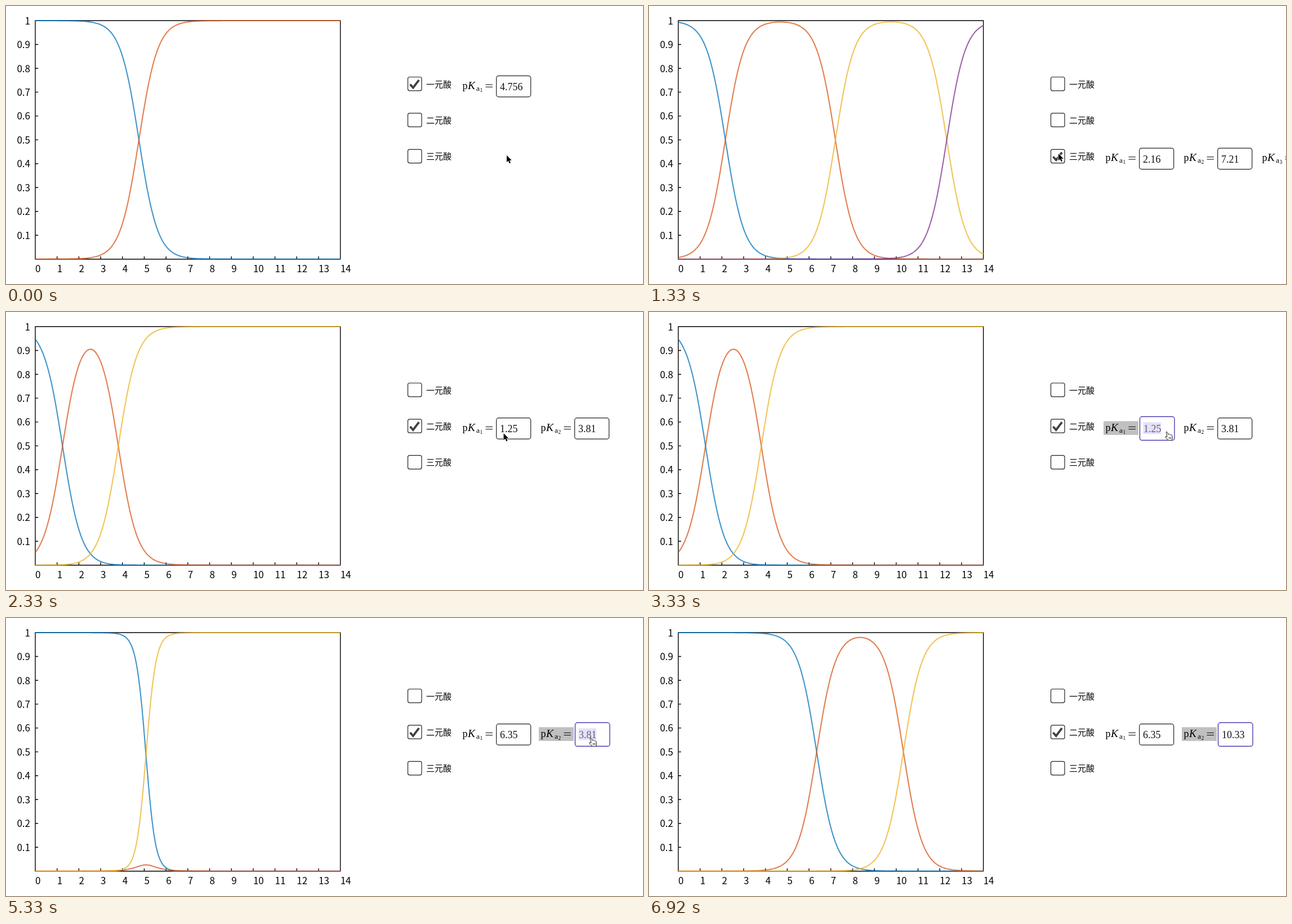
Write an HTML page that moves like this. It is 1131 by 495 pixels and loops after 7.5 s.

```html
<!DOCTYPE html>
<html lang="zh">
<head>
<meta charset="utf-8">
<style>
  html, body { margin: 0; width: 100%; height: 100%; overflow: hidden; background: #fff; }
  svg { display: block; }
  .axis { font: 17px "Noto Sans CJK SC", "Noto Sans CJK", sans-serif; }
  .name { font: 500 15px "Noto Sans CJK SC", "Noto Sans CJK", sans-serif; }
  .math { font: 18px "Liberation Serif", serif; }
  .line { fill: none; stroke: #000; stroke-width: 1.4; }
  .box { fill: #fff; stroke: #222; stroke-width: 1.2; }
  .focus { stroke: #2c20a8; }
  .curve { fill: none; stroke-width: 2.1; stroke-opacity: .75; }
</style>
</head>
<body>
<svg width="1131" height="495" viewBox="0 0 1131 495">
  <g id="axes"></g>
  <g id="curves"></g>
  <g id="panel"></g>
  <g id="pointer"></g>
</svg>
<script>
const $ = id => document.getElementById(id);
const LOOP = 7500;
const X0 = 52, Y0 = 450.7, DX = 38.69, HEIGHT = 424.7;
const COLORS = ['#0072bd', '#d95319', '#edb120', '#7e2f8e'];
const NAMES = ['一元酸', '二元酸', '三元酸'];

const MONO = [4.756], DI = [1.25, 3.81], TRI = [2.16, 7.21, 12.32];
const arrow = (x, y) => ({ kind: 'arrow', x, y });
const hand = (x, y) => ({ kind: 'hand', x, y });

// Each step changes only the properties it lists.
const STEPS = [
  { at: 0, pk: MONO, text: MONO, focus: -1, selected: false, caret: false, cursor: arrow(889, 266) },
  { at: 330, cursor: hand(721, 202) },
  { at: 670, pk: DI, text: DI },
  { at: 1000, cursor: hand(721, 264) },
  { at: 1330, pk: TRI, text: TRI, cursor: arrow(727, 263) },
  { at: 2000, cursor: hand(730, 201) },
  { at: 2330, pk: DI, text: DI, cursor: arrow(883.5, 216) },
  { at: 2670, focus: 0, selected: true, cursor: hand(916, 212) },
  { at: 3670, text: ['6', 3.81], selected: false, cursor: null },
  { at: 4000, text: ['6.3', 3.81], cursor: arrow(957, 212) },
  { at: 4330, text: [6.35, 3.81], caret: true, cursor: hand(1035, 212) },
  { at: 4670, pk: [6.35, 3.81], focus: 1, selected: true, caret: false },
  { at: 5670, text: [6.35, '10'], selected: false, cursor: null },
  { at: 6000, text: [6.35, '10.'] },
  { at: 6330, text: [6.35, 10.33] },
  { at: 6920, pk: [6.35, 10.33] }
];

function drawAxes() {
  let ticks = '', labels = '';
  for (let i = 0; i <= 14; i++) {
    const x = X0 + i * DX;
    ticks += `M${x} ${Y0}v-5`;
    labels += `<text x="${x}" y="474.3">${i}</text>`;
  }
  for (let i = 1; i <= 10; i++) {
    const y = Y0 - HEIGHT * i / 10;
    ticks += `M${X0} ${y}h5`;
    labels += `<text x="43" y="${y + 6.6}" text-anchor="end">${i / 10}</text>`;
  }
  $('axes').innerHTML = `<g class="axis">${labels}</g>
    <path class="line" d="M${X0} ${Y0}V${Y0 - HEIGHT}H${X0 + 14 * DX}V${Y0}Z${ticks}"/>`;
}

// Share of every acid species at one pH.
function shares(pk, pH) {
  let sum = 0;
  const terms = [1, ...pk.map((k, i) => 10 ** ((i + 1) * pH - (sum += k)))];
  const total = terms.reduce((a, b) => a + b);
  return terms.map(v => v / total);
}

function drawCurves(pk) {
  const paths = Array(pk.length + 1).fill('');
  for (let i = 0; i <= 280; i++) {
    const pH = i / 20;
    shares(pk, pH).forEach((v, k) => {
      paths[k] += `${i ? 'L' : 'M'}${(X0 + pH * DX).toFixed(2)} ${(Y0 - v * HEIGHT).toFixed(2)}`;
    });
  }
  return paths.map((d, k) => `<path class="curve" stroke="${COLORS[k]}" d="${d}"/>`).join('');
}

// One labelled input, in coordinates of the first field of the first row.
function field(value, i, s) {
  const on = s.focus === i;
  const x = on ? 878 : 877;
  const width = (String(value).replace('.', '').length + .5) * 9;
  return `<g class="math" transform="translate(${i * 139})">
    ${on ? '<rect x="807" y="130" width="62" height="24.5" fill="#c0c0c0"/>' : ''}
    <text x="810.5" y="147.5">p</text>
    <text x="820" y="147.5" font-style="italic" font-size="19.5">K</text>
    <text x="835" y="150.5" font-size="13.5">a</text>
    <text x="841.5" y="152.5" font-size="9.5">${i + 1}</text>
    <path d="M851.5 140h12.5m0 4.2h-12.5" stroke="#000" fill="none"/>
    ${on ? '<rect class="box focus" x="871.5" y="122" width="61.5" height="42" rx="4"/>'
         : '<rect class="box" x="870.7" y="124.3" width="61" height="37.5" rx="4"/>'}
    ${on && s.selected ? `<rect x="${x - .5}" y="132" width="${width}" height="21" fill="#e4e1f8"/>` : ''}
    <text x="${x}" y="149.8" fill="${on && s.selected ? '#665d80' : '#111'}">${value}</text>
    ${on && s.caret ? `<path d="M${x + width + .2} 135v18" stroke="#2c20a8"/>` : ''}
  </g>`;
}

function drawPanel(s) {
  return NAMES.map((name, row) => {
    const checked = row === s.pk.length - 1;
    return `<g transform="translate(0 ${row * 64.4})">
      <rect class="box" x="713.5" y="126.5" width="24.5" height="24.3" rx="3"/>
      ${checked ? '<path d="M717.5 139.5l5.3 6 10.4-13.7" fill="none" stroke="#404040" stroke-width="3.8"/>' : ''}
      <text class="name" x="746" y="144.6">${name}</text>
      ${checked ? s.text.map((v, i) => field(v, i, s)).join('') : ''}
    </g>`;
  }).join('');
}

function drawPointer(c) {
  if (!c) return '';
  const shape = c.kind === 'arrow'
    ? '<path d="M0 0V12.2L2.8 9.6 4.8 14.3 7 13.3 5 8.8H8.8Z" stroke="#fff" stroke-width="1.6" paint-order="stroke"/>'
    : `<path d="M2.2 1.5q1.3-1 2.2.6L6 6q1.6-1 2.3.3 1.5-.8 2.2.5 1.8-.4 2.2 1.2L13.6 12 12.5 16.5H6.5L1 11.5q-.9-1.7 1-2L4 10.5Z"
        fill="#fff" stroke="#222"/><path d="M7.3 10.5v3.5m1.9-3.5v3.5m1.9-3.5v3.5" stroke="#222" stroke-width=".8"/>`;
  return `<g transform="translate(${c.x} ${c.y})">${shape}</g>`;
}

let shown = -1;
function frame() {
  const t = performance.now() % LOOP;
  const past = STEPS.filter(step => step.at <= t);
  if (past.length !== shown) {
    shown = past.length;
    const state = Object.assign({}, ...past);
    $('curves').innerHTML = drawCurves(state.pk);
    $('panel').innerHTML = drawPanel(state);
    $('pointer').innerHTML = drawPointer(state.cursor);
  }
  requestAnimationFrame(frame);
}

drawAxes();
frame();
</script>
</body>
</html>
```
